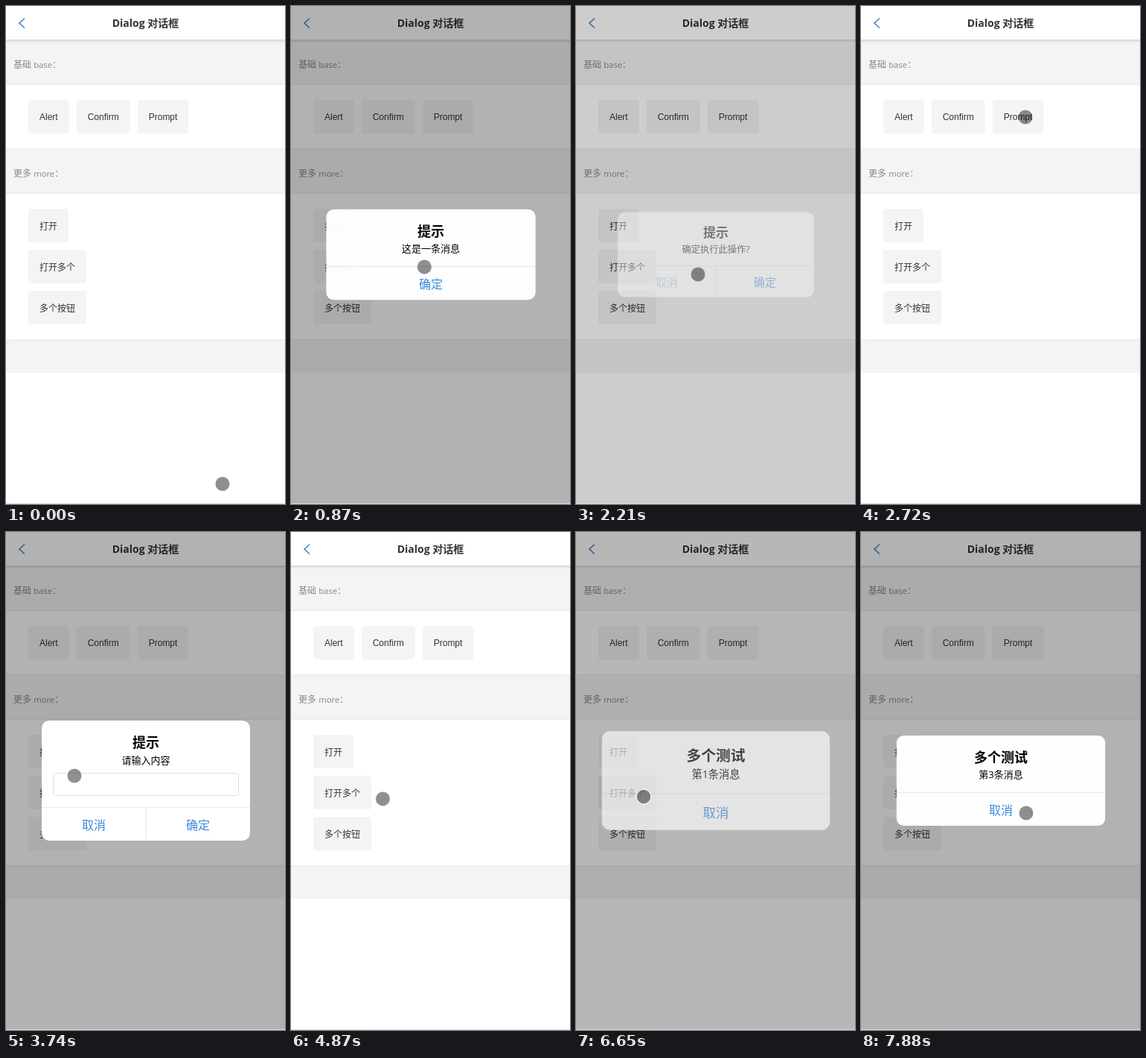
An HTML page that plays this animation: 375 px wide and 668 px high, repeating every 8000 ms.

```html
<!DOCTYPE html>
<html lang="zh-CN">
<head>
<meta charset="utf-8">
<title>Dialog</title>
<style>
html, body { margin: 0; width: 100%; height: 100%; overflow: hidden; background: #fff; }
svg { display: block; width: 100vw; height: 100vh; }
text { font-family: "Open Sans", "Noto Sans CJK SC", "Noto Sans CJK", sans-serif; }
.latin { font-family: "Liberation Sans", Arial, sans-serif; }
.mid { text-anchor: middle; }
.bold { font-weight: 700; }
</style>
</head>
<body>
<svg viewBox="0 0 375 668">
  <defs>
    <filter id="soft" x="-10%" y="-30%" width="120%" height="160%"><feGaussianBlur stdDeviation="2.2"/></filter>
  </defs>
  <g id="page"></g>
  <g id="buttons"></g>
  <rect id="mask" width="375" height="667"/>
  <g id="dialogs"></g>
  <rect y="667" width="375" height="1" fill="#dcdcdc"/>
  <g id="cursor">
    <circle r="9.5" fill="#000" fill-opacity=".44"/>
    <circle id="ring" r="10" fill="none" stroke="#fff" stroke-opacity=".7" stroke-width="1.4"/>
  </g>
</svg>
<script>
const LOOP = 8000, OPEN_MS = 400, CLOSE_MS = 300, MASK_MS = 200, TRAVEL_MS = 280;
const CENTER_X = 188, CENTER_Y = 333.5, DIALOG_W = 280, ACTION_H = 45;
const $ = id => document.getElementById(id);
const clamp = v => Math.max(0, Math.min(1, v));
const within = (t, a, b) => t >= a && t < b;

const rect = (x, y, w, h, fill, extra = '') =>
  `<rect x="${x}" y="${y}" width="${w}" height="${h}" fill="${fill}" ${extra}/>`;
const text = (x, y, size, fill, str, cls = '') =>
  `<text x="${x}" y="${y}" font-size="${size}" fill="${fill}" class="${cls}">${str}</text>`;

function addGroup(parent, markup) {
  const g = document.createElementNS('http://www.w3.org/2000/svg', 'g');
  g.innerHTML = markup;
  return $(parent).appendChild(g);
}

// CSS "ease": cubic-bezier(.25, .1, .25, 1)
function ease(x) {
  if (x <= 0 || x >= 1) return clamp(x);
  const curve = (u, a, b) => 3 * a * u * (1 - u) ** 2 + 3 * b * u * u * (1 - u) + u ** 3;
  let lo = 0, hi = 1;
  for (let i = 0; i < 24; i++) {
    const u = (lo + hi) / 2;
    if (curve(u, 0.25, 0.25) < x) lo = u; else hi = u;
  }
  return curve(lo, 0.1, 1);
}

// Page
const panel = (y, h) =>
  rect(0, y, 375, h, '#000', 'opacity=".06" filter="url(#soft)"') + rect(0, y, 375, h, '#fff');
const label = (y, han, latin) =>
  text(10, y, 12, '#888', `${han} <tspan font-size="11.3">${latin}</tspan>：`);

$('page').innerHTML =
  rect(0, 0, 375, 668, '#fff') + rect(0, 45, 375, 447, '#f4f4f4') +
  panel(106, 85) + panel(252, 195) +
  rect(-5, 0, 385, 46, '#000', 'opacity=".19" filter="url(#soft)"') + rect(0, 0, 375, 45, '#fff') +
  '<path d="M25 16.5 18 23 25 29.5" fill="none" stroke="#4d8bc9" stroke-width="1.7"/>' +
  text(187.5, 28, 14, '#333', 'Dialog 对话框', 'mid bold') +
  label(83, '基础', 'base') + label(229, '更多', 'more');

function addButton(x, y, caption, cls) {
  const g = addGroup('buttons', rect(x, y, 0, 45, '#f4f4f4', 'rx="4"') +
    text(x + 15, y + (cls ? 27 : 28), 12, '#333', caption, cls));
  const [box, words] = g.children;
  const width = words.getComputedTextLength() + 30;
  box.setAttribute('width', width);
  return { box, right: x + width };
}

const buttons = {};
let left = 30;
for (const caption of ['Alert', 'Confirm', 'Prompt']) {
  buttons[caption] = addButton(left, 126, caption, 'latin');
  left = buttons[caption].right + 10;
}
['打开', '打开多个', '多个按钮'].forEach((caption, i) => {
  buttons[caption] = addButton(30, 272 + 55 * i, caption);
});

// Each dialog: when it opens and closes, the button that opens it (from),
// and where the pointer rests on that button (start), field and action (hit).
const multi = n => ({ title: '多个测试', message: `第${n}条消息`, actions: ['取消'], queued: true });
const dialogs = [
  { title: '提示', message: '这是一条消息', actions: ['确定'],
    from: 'Alert', open: 535, close: 1090, start: [60, 152], hit: [188, 372] },
  { title: '提示', message: '确定执行此操作?', actions: ['取消', '确定'],
    from: 'Confirm', open: 1582, close: 2110, start: [137, 149], hit: [164, 360] },
  { title: '提示', message: '请输入内容', actions: ['取消', '确定'],
    from: 'Prompt', open: 2890, close: 4325, start: [221, 149], field: [92, 327], hit: [178, 383] },
  { title: '在"岚笺"中打开链接吗?', actions: ['打开'],
    from: '打开', open: 5174, close: 5968, start: [74, 317], hit: [188.5, 366] },
  { ...multi(1), from: '打开多个', open: 6490, close: 7140, start: [91, 355], hit: [190, 372] },
  { ...multi(2), open: 7180, close: 7480, hit: [222, 377] },
  { ...multi(3), open: 7520, close: Infinity },
];

function buildDialog(d) {
  const body = d.field ? 116 : d.message ? 76 : 55;
  const height = body + ACTION_H, top = CENTER_Y - height / 2, x = CENTER_X - DIALOG_W / 2;
  const cell = DIALOG_W / d.actions.length;
  let out = rect(x, top, DIALOG_W, height, '#fff', 'rx="10"') +
    text(CENTER_X, top + 36, 18, '#000', d.title, 'mid bold');
  if (d.message) out += text(CENTER_X, top + 57.5, 13, '#000', d.message, 'mid');
  if (d.field) out += rect(x + 15.5, top + 70.5, DIALOG_W - 31, 30, '#fff', 'stroke="#ddd" rx="3"');
  out += rect(x, top + body, DIALOG_W, 1, '#e8e8e8');
  if (d.actions.length > 1) out += rect(CENTER_X - 0.5, top + body, 1, ACTION_H, '#e8e8e8');
  d.actions.forEach((caption, i) => {
    out += text(x + cell * (i + 0.5), top + body + 30, 16, '#3d8bdf', caption, 'mid action');
  });
  d.node = addGroup('dialogs', out);
  d.pressed = d.node.querySelector('.action');
}
dialogs.forEach(buildDialog);

// Pointer stops follow from the dialog times.
const stops = [{ at: 0, spot: [291, 641] }];
for (const d of dialogs) {
  if (d.start) stops.push({ at: d.open - 170, spot: d.start });
  if (d.field) stops.push({ at: d.open + 700, spot: d.field });
  if (d.hit) stops.push({ at: d.close - 200, spot: d.hit });
}

function pointerAt(t) {
  let [x, y] = stops[0].spot;
  for (const { at, spot } of stops) {
    const k = clamp((t - at) / TRAVEL_MS + 1);
    x += (spot[0] - x) * k;
    y += (spot[1] - y) * k ** 1.5;
  }
  return [x, y];
}

function drawDialog(d, t) {
  const visible = within(t, d.open, d.close + CLOSE_MS);
  d.node.style.display = visible ? '' : 'none';
  if (!visible) return;
  const enter = ease((t - d.open) / OPEN_MS);
  const leave = ease((t - d.close) / CLOSE_MS);
  const scale = 1.3 - 0.3 * enter - 0.1 * leave;
  d.node.setAttribute('opacity', enter ** 1.25 * (1 - leave));
  d.node.setAttribute('transform',
    `translate(${CENTER_X} ${CENTER_Y}) scale(${scale}) translate(${-CENTER_X} ${-CENTER_Y})`);
  d.pressed.setAttribute('opacity', t > d.close - 20 ? 0.45 : 1);
}

// The mask leads the dialog in, trails it out, and stays up through a queue.
function maskLevel(d, t) {
  const shown = clamp((t - d.open + 26) / MASK_MS);
  return d.queued ? shown : shown * (1 - clamp((t - d.close - 32) / MASK_MS));
}

function render(t) {
  $('mask').setAttribute('opacity', 0.3 * Math.max(...dialogs.map(d => maskLevel(d, t))));
  dialogs.forEach(d => drawDialog(d, t));

  const active = dialogs.find(d => d.from && within(t, d.open - 60, d.open + 190));
  for (const caption in buttons) {
    const on = active && active.from === caption;
    buttons[caption].box.setAttribute('fill', on ? '#ededed' : '#f4f4f4');
  }
  $('ring').style.display = active ? '' : 'none';
  $('cursor').setAttribute('transform', `translate(${pointerAt(t).join(' ')})`);
}

const begin = performance.now();
function tick() {
  render((performance.now() - begin) % LOOP);
  requestAnimationFrame(tick);
}
tick();
</script>
</body>
</html>
```
